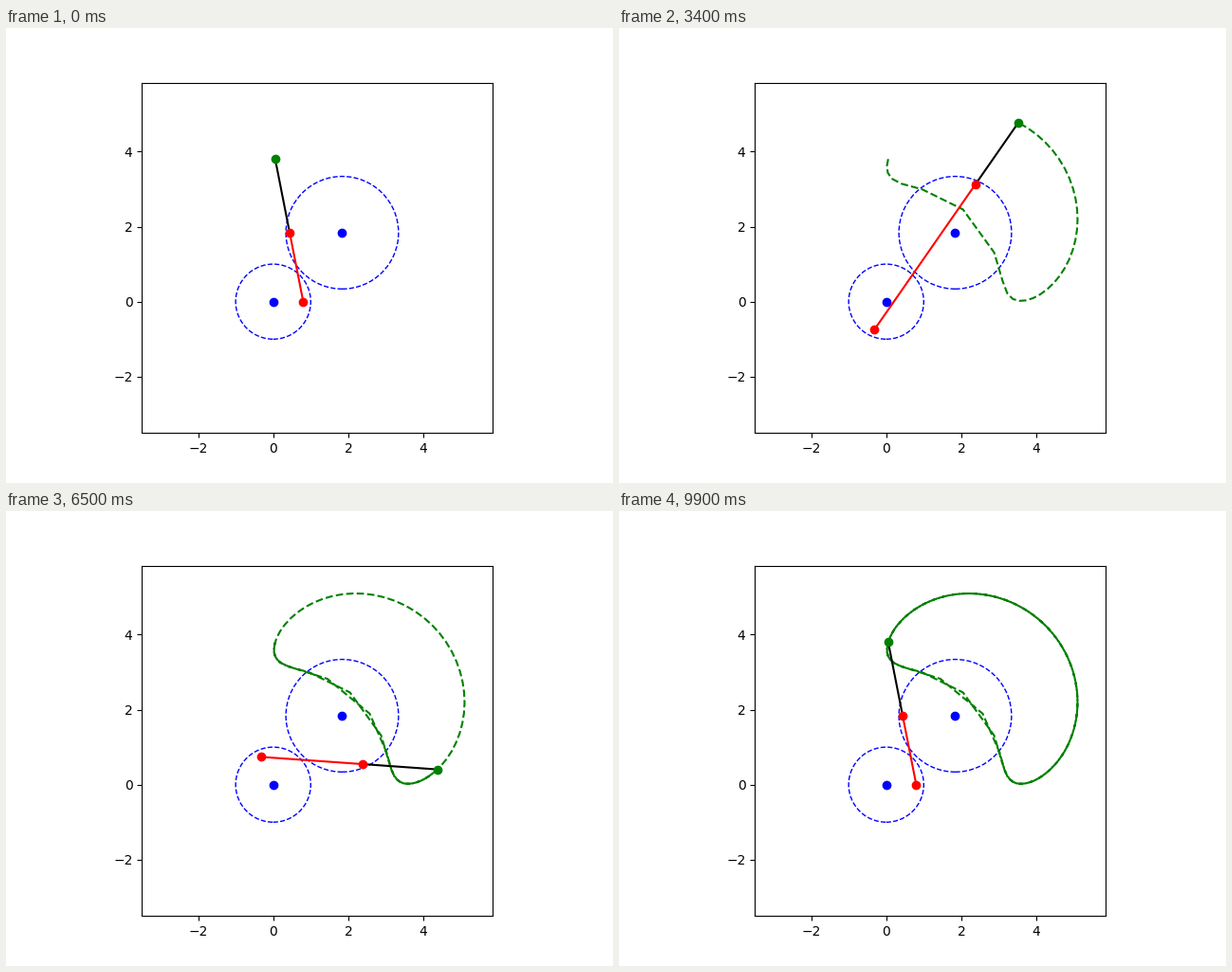
Animation, 640 px wide and 480 px high, one loop 10000 ms. Source, as a matplotlib script:

```python
import numpy as np
import matplotlib.pyplot as plt
from matplotlib.animation import FuncAnimation

FRAMES = 100
GEAR_R = (1.0, 1.5)     # pitch radii
CRANK_R = (0.8, 1.4)    # pin distance from each centre
PHASE = (0.0, np.pi)
ARM = 2.0               # length of the arm beyond the second pin
MARGIN = 2.5

offset = (sum(GEAR_R) + 0.1) / np.sqrt(2)
centres = np.array([[0, 0], [offset, offset]])
theta = np.linspace(0, 4 * np.pi, FRAMES)


def pin(k):
    a = theta + PHASE[k]
    return centres[k] + CRANK_R[k] * np.column_stack([np.cos(a), np.sin(a)])


pin_a, pin_b = pin(0), pin(1)
rod = pin_b - pin_a
tip = pin_b + ARM * rod / np.linalg.norm(rod, axis=1, keepdims=True)

fig, ax = plt.subplots(figsize=(6.4, 4.8), dpi=100)
ax.set_aspect("equal")
limits = (-GEAR_R[0] - MARGIN, offset + GEAR_R[1] + MARGIN)
ax.set(xlim=limits, ylim=limits)

for centre, radius in zip(centres, GEAR_R):
    ax.add_patch(plt.Circle(centre, radius, fill=False, color="b", ls="--"))
    ax.plot(*centre, "bo")

trail, = ax.plot([], [], "g--")
arm_line, = ax.plot([], [], "k-")
rod_line, = ax.plot([], [], "ro-")
tip_dot, = ax.plot([], [], "go")


def update(i):
    trail.set_data(*tip[:i + 1].T)
    arm_line.set_data(*np.array([pin_b[i], tip[i]]).T)
    rod_line.set_data(*np.array([pin_a[i], pin_b[i]]).T)
    tip_dot.set_data(*tip[i:i + 1].T)
    return trail, arm_line, rod_line, tip_dot


anim = FuncAnimation(fig, update, frames=FRAMES, interval=100, repeat=True,
                     repeat_delay=0)
plt.show()
```
